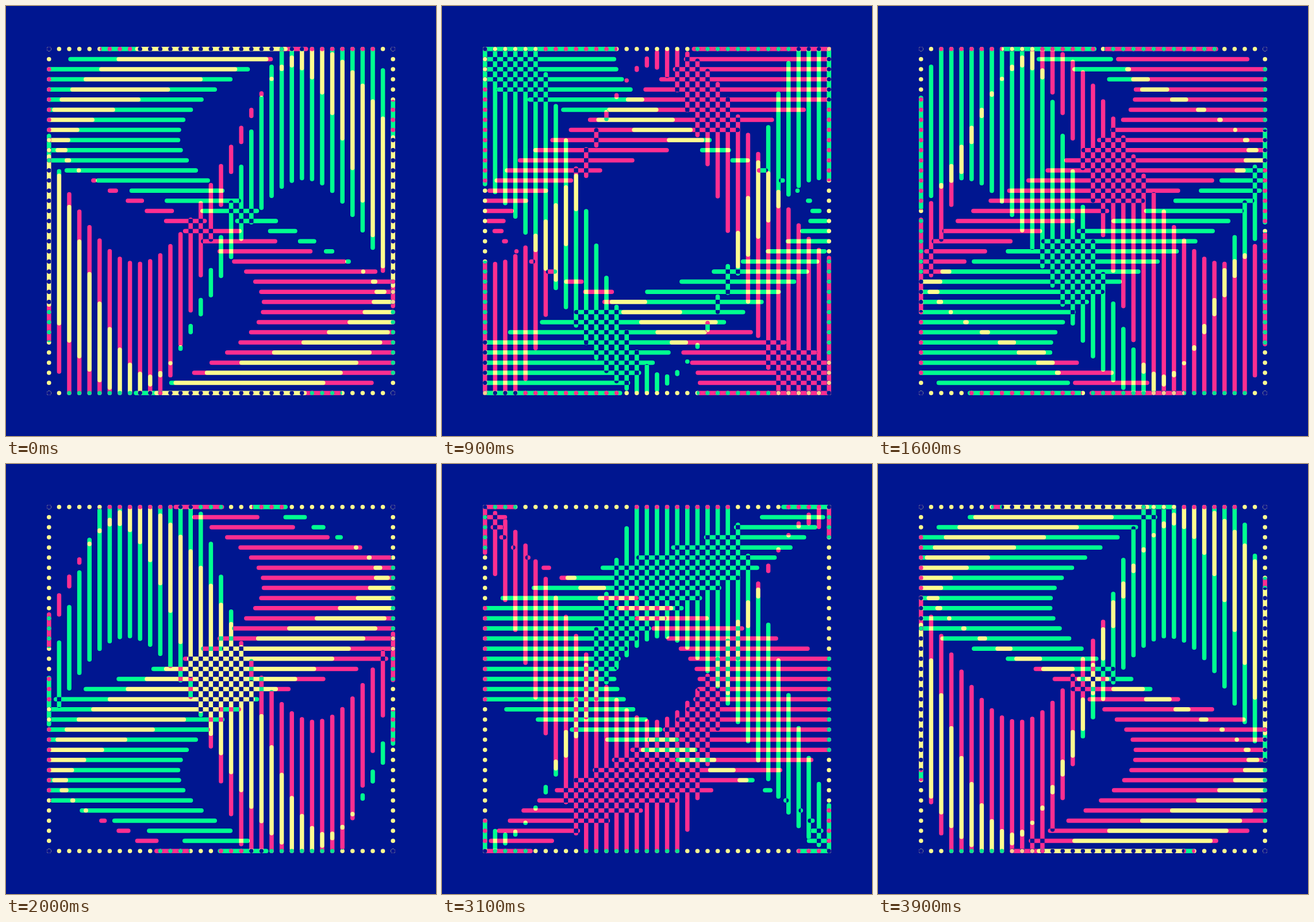
An HTML page with a canvas that plays this animation: 748 by 748 pixels, repeating every 4 s.

```html
<!DOCTYPE html>
<html lang="en">
<head>
<meta charset="utf-8">
<title>Woven waves</title>
<style>
  html, body { margin: 0; height: 100%; overflow: hidden; background: #001690; }
  canvas { display: block; }
</style>
</head>
<body>
<canvas id="stage" width="748" height="748"></canvas>
<script>
const SIZE = 748, ROWS = 35, EDGE = SIZE * 0.4, GAP = 2 * EDGE / (ROWS - 1);
const LOOP = 4000, STEP = 100, TAU = 2 * Math.PI;
const PINK = '#ff1800', GREEN = '#00ff00', BASE = '#001690';
const ctx = document.getElementById('stage').getContext('2d');

// A bar of no length still shows as a round dot.
function bar(from, to, y) {
  ctx.moveTo(from, y);
  ctx.lineTo(to + 0.01, y);
}

function strokeRows(drawRow) {
  ctx.beginPath();
  for (let i = 0; i < ROWS; i++) drawRow(i, i * GAP - EDGE);
  ctx.stroke();
}

function drawSide(phase) {
  strokeRows((i, y) => {
    const angle = TAU * (i / ROWS + phase);
    const end = SIZE * (0.15 - 0.25 * Math.sin(angle));
    const length = SIZE * 0.25 * (1 + Math.sin(angle + TAU / 8));
    bar(Math.max(-EDGE, end - length), end, y);
    bar(EDGE, EDGE, y);
  });
  strokeRows((i, y) => bar(-EDGE, -EDGE, y));
}

function fillStage(mode, color) {
  ctx.globalCompositeOperation = mode;
  ctx.fillStyle = color;
  ctx.fillRect(0, 0, SIZE, SIZE);
}

function draw(phase) {
  fillStage('source-over', '#000');
  ctx.globalCompositeOperation = 'difference'; // overlaps cancel out
  ctx.lineWidth = SIZE * 0.01;
  ctx.lineCap = 'round';
  for (let side = 0; side < 4; side++) {
    ctx.save();
    ctx.translate(SIZE / 2, SIZE / 2);
    ctx.rotate(side * TAU / 4);
    ctx.strokeStyle = side < 2 ? GREEN : PINK;
    drawSide(phase);
    ctx.restore();
  }
  fillStage('lighter', BASE);
}

function tick() {
  // Ten poses a second; the small lead absorbs display latency.
  const pose = Math.floor((performance.now() + 10) / STEP);
  draw(pose * STEP % LOOP / LOOP);
  requestAnimationFrame(tick);
}
tick();
</script>
</body>
</html>
```
